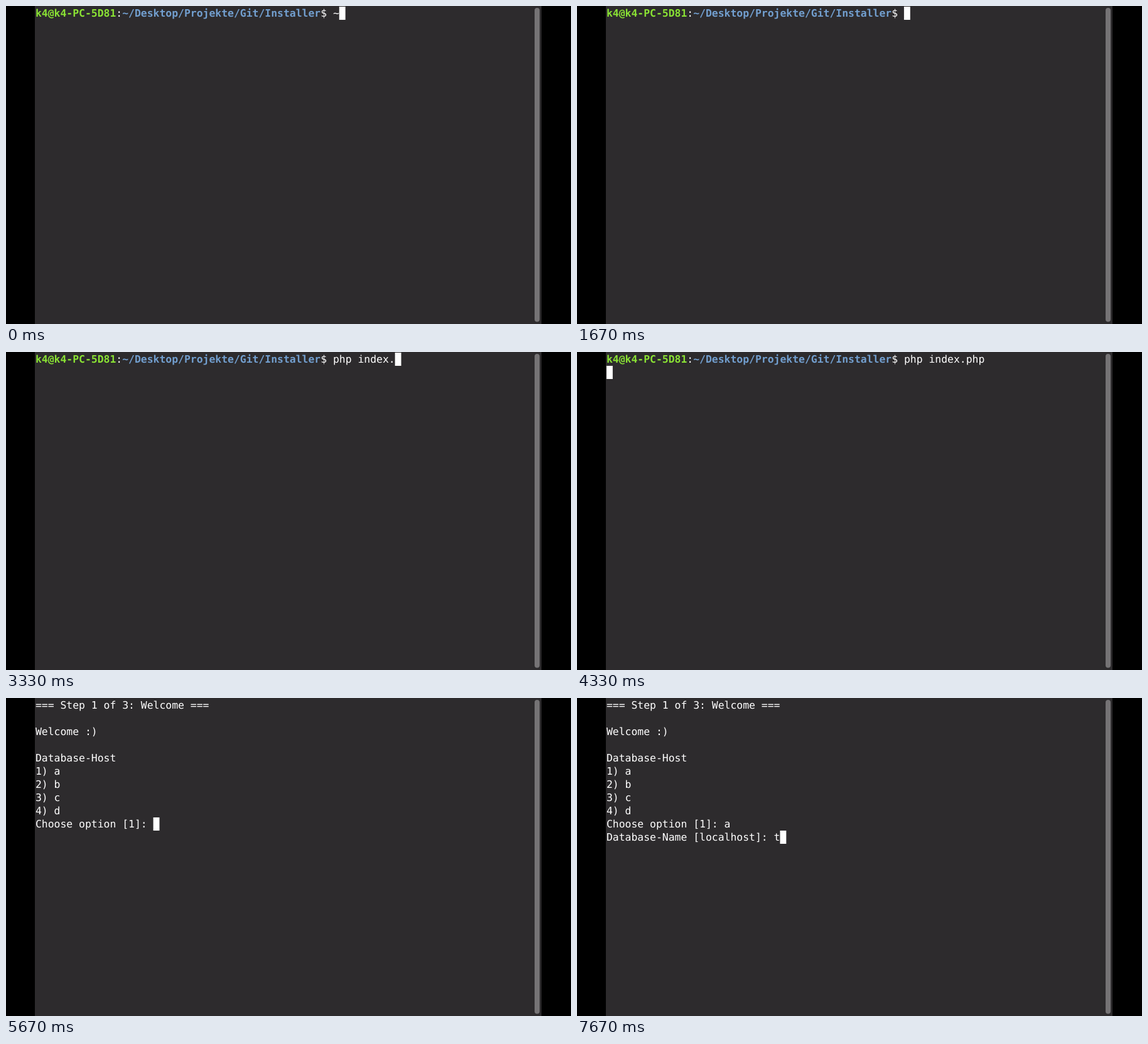
Recreate the animation shown at these times as an HTML page with a canvas. Size 900 by 506 pixels, loop 8 s.

```html
<!DOCTYPE html>
<html lang="en">
<head>
<meta charset="utf-8">
<title>Terminal installer</title>
<style>
  html, body { margin: 0; width: 100%; height: 100%; overflow: hidden; background: #000; }
  canvas { display: block; }
</style>
</head>
<body>
<canvas id="stage" width="900" height="506"></canvas>
<script>
const ctx = document.getElementById("stage").getContext("2d");
const LOOP = 8000;
const LEFT = 47, TOP = 1, CELL = 9.873, LINE = 21, BASELINE = 16;
const WHITE = "#fff", GREEN = "#8ae234", BLUE = "#729fcf";

const prompt = [
  ["k4@k4-PC-5D81", GREEN, true],
  [":", WHITE],
  ["~/Desktop/Projekte/Git/Installer", BLUE, true],
  ["$ ", WHITE],
];
const form = [
  "=== Step 1 of 3: Welcome ===", "", "Welcome :)", "", "Database-Host",
  "1) a", "2) b", "3) c", "4) d", "Choose option [1]: ",
];
const nameLabel = "Database-Name [localhost]: ";

// Each state: start time, screen, typed text, cursor visible
const states = [
  [0, "shell", "~", true],
  [330, "shell", "~", false],
  [1000, "shell", "~", true],
  [1670, "shell", "", true],
  [2330, "shell", "php", true],
  [2670, "shell", "php i", true],
  [3000, "shell", "php inde", true],
  [3330, "shell", "php index.", true],
  [4000, "shell", "php index.php", true],
  [4330, "shell", "php index.php\n", true],
  [4670, "host", "", true],
  [5000, "host", "", false],
  [5670, "host", "", true],
  [6000, "host", "a", true],
  [6330, "host", "a\n" + nameLabel, true],
  [7000, "host", "a\n" + nameLabel, false],
  [7670, "host", "a\n" + nameLabel + "t", true],
];

function drawWindow() {
  ctx.fillStyle = "#000";
  ctx.fillRect(0, 0, 900, 506);
  ctx.fillStyle = "#2d2b2d";
  ctx.fillRect(46, 0, 807, 506);
  ctx.fillStyle = "#757375";
  ctx.beginPath();
  ctx.roundRect(842, 3, 8, 499.5, 4);
  ctx.fill();
}

// Prints on the character grid and returns the cell after the text.
function print(text, col = 0, row = 0, color = WHITE, bold = false) {
  ctx.font = `${bold ? "bold " : ""}16.4px "DejaVu Sans Mono", monospace`;
  ctx.textRendering = "geometricPrecision";
  ctx.fillStyle = color;
  for (const char of text) {
    if (char === "\n") {
      col = 0;
      row++;
    } else {
      ctx.fillText(char, LEFT + col * CELL, TOP + row * LINE + BASELINE);
      col++;
    }
  }
  return [col, row];
}

function printPrompt() {
  let pos = [0, 0];
  for (const [text, color, bold] of prompt) pos = print(text, ...pos, color, bold);
  return pos;
}

function render(now) {
  const time = now % LOOP;
  const [, screen, typed, cursor] = states.findLast(([start]) => start <= time);
  drawWindow();
  const start = screen === "shell" ? printPrompt() : print(form.join("\n"));
  const [col, row] = print(typed, ...start);
  if (cursor) {
    ctx.fillStyle = WHITE;
    ctx.fillRect(LEFT + col * CELL, TOP + row * LINE, CELL, LINE);
  }
}

function tick() {
  render(performance.now());
  requestAnimationFrame(tick);
}
tick();
</script>
</body>
</html>
```
